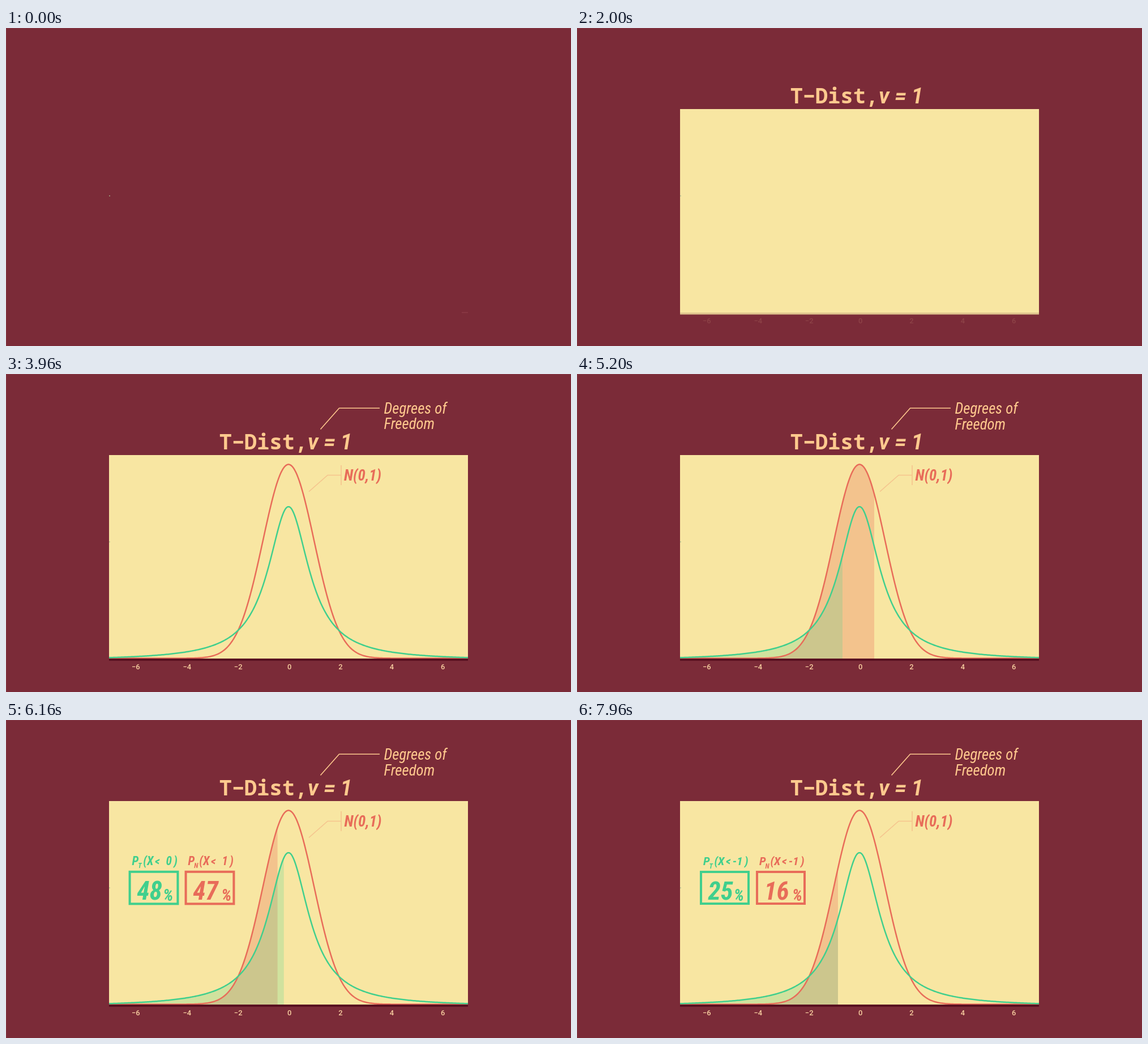
Animation, 998 px wide and 561 px high, one loop 8 s. Source, as an HTML page:

```html
<!DOCTYPE html>
<html lang="en">
<head>
<meta charset="utf-8">
<title>The Student's T distribution</title>
<style>
  html, body { margin: 0; width: 100%; height: 100%; overflow: hidden; background: #7b2b38; }
  svg { display: block; width: 100vw; height: 100vh; }
  text { font-family: Roboto, "Open Sans", sans-serif; white-space: pre; }
  .cond { font-family: "Roboto Condensed", Roboto, "Open Sans", sans-serif; font-stretch: 75%; }
  .mono { font-family: "Roboto Mono", "Noto Sans Mono", "DejaVu Sans Mono", monospace; }
  .bold { font-weight: 700; }
  .ital { font-style: italic; }
  .line { fill: none; stroke-linejoin: round; }
</style>
</head>
<body>
<svg id="stage" viewBox="0 0 998 561" preserveAspectRatio="none">
  <defs>
    <clipPath id="tEdge"><rect id="tClip" x="182" y="143" width="0" height="359"/></clipPath>
    <clipPath id="nEdge"><rect id="nClip" x="182" y="143" width="0" height="359"/></clipPath>
    <clipPath id="plot"><rect x="182" y="143" width="634" height="361"/></clipPath>
    <clipPath id="slot"><rect x="593" y="155" width="110" height="50"/></clipPath>
  </defs>
</svg>
<script>
const LOOP = 8000;
const CREAM = '#fbe3a3', PEACH = '#ffc98e', GREEN = '#40cf8d', RED = '#e86c59';
const LEFT = 182, RIGHT = 816, MID = 499;
const stage = document.getElementById('stage');

function add(parent, tag, attrs, content) {
  const el = document.createElementNS('http://www.w3.org/2000/svg', tag);
  for (const k in attrs) el.setAttribute(k, attrs[k]);
  if (content !== undefined) el.textContent = content;
  parent.appendChild(el);
  return el;
}
const group = (parent, attrs) => add(parent, 'g', attrs || {});

// Falls back to a narrowed Roboto when no condensed face is available
function condensedScale() {
  const measure = cls => {
    const el = add(stage, 'text', { class: cls, 'font-size': 100 }, 'DISTRIBUTION');
    const w = el.getComputedTextLength();
    el.remove();
    return w;
  };
  return measure('cond') < measure('') * 0.97 ? 1 : 0.88;
}
const narrow = condensedScale();

function label(parent, x, y, size, fill, cls, str, extra) {
  const k = cls.includes('cond') ? narrow : 1;
  return add(parent, 'text', Object.assign({
    transform: `translate(${x} ${y}) scale(${k} 1)`, 'font-size': size, fill, class: cls
  }, extra), str);
}

const clamp = v => Math.max(0, Math.min(1, v));
const span = (t, start, dur) => clamp((t - start) / dur);
const inOut = p => p < 0.5 ? 2 * p * p : 1 - 2 * (1 - p) ** 2;
const inOut3 = p => p < 0.5 ? 4 * p ** 3 : 1 - 4 * (1 - p) ** 3;
const spring = d => d <= 0 ? 0 : 1 - Math.exp(-d / 180) * Math.cos(2 * Math.PI * d / 420);
const scaleAt = (el, x, y, s) => el.setAttribute('transform', `translate(${x} ${y}) scale(${s}) translate(${-x} ${-y})`);
const shift = (el, x) => el.setAttribute('transform', `translate(${x} 0)`);
const show = (el, on) => el.setAttribute('visibility', on ? 'visible' : 'hidden');

function stroke(parent, d, color, width) {
  return add(parent, 'path', {
    d, class: 'line', stroke: color, 'stroke-width': width, pathLength: 1, 'stroke-dasharray': '1 2'
  });
}
function draw(path, p) {
  show(path, p > 0);
  path.setAttribute('stroke-dashoffset', 1 - p);
}
function curve(fn) {
  const pts = [];
  for (let x = LEFT; x <= RIGHT; x += 2) pts.push(x + ' ' + fn(x - MID).toFixed(2));
  return 'M' + pts.join('L');
}
const tCurve = curve(x => 505.5 - 271.5 / (1 + (x / 44) ** 2));
const nCurve = curve(x => 501.5 - 342 * Math.exp(-((x / 45.2) ** 2) / 2));
const closed = d => `${d}L${RIGHT} 506L${LEFT} 506Z`;

// Background
add(stage, 'rect', { width: 998, height: 561, fill: '#7b2b38' });
add(stage, 'path', { d: 'M.5 561V.5H998', class: 'line', stroke: '#fff', opacity: 0.06 });
add(stage, 'rect', { x: 805, y: 501.5, width: 11, height: 1, fill: '#a4525a', opacity: 0.6 });

// Opening line
const words = [
  [112, 'THE ', 'cond', 0],
  [191, 'STUDENT\u2019S ', 'cond bold', 2.1],
  [395, 'T ', 'cond bold', 0],
  [430.5, 'DISTRIBUTION', 'cond', 0]
].map(([x, str, cls, gap]) => ({
  str, el: label(stage, x, 273, 37, CREAM, cls, '', { 'letter-spacing': gap })
}));

// Chart
const panel = group(stage);
add(panel, 'rect', { x: LEFT, y: 143, width: 634, height: 362.5, fill: '#f8e6a2' });
const chart = group(stage, { 'clip-path': 'url(#plot)' });
add(chart, 'path', { d: closed(nCurve), fill: RED, 'fill-opacity': 0.29, 'clip-path': 'url(#nEdge)' });
add(chart, 'path', { d: closed(tCurve), fill: GREEN, 'fill-opacity': 0.22, 'clip-path': 'url(#tEdge)' });
const nLine = stroke(chart, nCurve, RED, 2.5);
const tLine = stroke(chart, tCurve, GREEN, 2.5);
const tClip = document.getElementById('tClip'), nClip = document.getElementById('nClip');

const axis = group(stage);
add(axis, 'rect', { x: LEFT, y: 502, width: 634, height: 4, fill: '#591021' });
for (let v = -6; v <= 6; v += 2) {
  label(axis, 500.6 + v * 45.2, 521, 13, '#f8cfa0', '', String(v).replace('-', '\u2212'),
    { 'text-anchor': 'middle', 'font-weight': 500 });
}
add(stage, 'rect', { x: 182, y: 295.5, width: 2, height: 1.3, fill: '#a9c08f' });

// Heading
const heading = group(stage);
label(heading, 376.7, 133, 37, PEACH, 'mono bold', 'T\u2212Dist,');
[[533, 'v'], [561, '='], [590.5, '1']].forEach(([x, s]) => label(heading, x, 133, 38, PEACH, 'bold ital', s));

const pointer = stroke(stage, 'M555.5 97.5L588.5 60.3H660', PEACH, 1.6);
const degrees = group(stage);
label(degrees, 667.5, 70, 26.8, PEACH, 'cond ital', 'Degrees of');
label(degrees, 667.5, 97.5, 26.8, PEACH, 'cond ital', 'Freedom');

// Normal curve callout
const callLine = stroke(stage, 'M535 207.5L568 178.5H592', '#f5c38d', 1.6);
const callBar = add(stage, 'path', { class: 'line', stroke: '#f5c38d', 'stroke-width': 1.6 });
const callText = group(group(stage, { 'clip-path': 'url(#slot)' }));
label(callText, 597.5, 188, 27, RED, 'cond bold ital', 'N(0,1)');

// Probability boxes
function stat(x, color, sub, pctX) {
  const g = group(stage);
  const put = (dx, y, size, str, extra) => label(g, x + dx, y, size, color, 'cond bold ital', str, extra);
  add(g, 'rect', { x: x + 2, y: 268, width: 84, height: 56, fill: 'none', stroke: color, 'stroke-width': 4 });
  put(6, 256, 21, 'P');
  put(16.5, 261.5, 12, sub);
  put(25.5, 256, 21, '(X');
  put(46, 256, 20, '<');
  const limit = put(75.5, 256, 21, '', { 'text-anchor': 'end' });
  put(79, 256, 21, ')');
  const value = put(14.5, 317, 45, '');
  put(pctX, 319, 29, '%', { 'font-weight': 500 });
  return {
    g,
    set(scale, lim, pct) {
      show(g, scale > 0);
      scaleAt(g, x + 44, 290, Math.max(scale, 0.001));
      limit.textContent = lim;
      value.textContent = Math.round(pct);
    }
  };
}
const tStat = stat(217, GREEN, 'T', 60);
const nStat = stat(316, RED, 'N', 64);

const tProb = x => 100 * (0.5 + Math.atan(x) / Math.PI);
// Logistic-style approximation of the normal distribution function
const nProb = x => 100 / (1 + Math.exp(-1.5957 * x - 0.0713 * x ** 3));

// Shaded area grows to the right, then falls back to the left tail
function edge(t, riseAt, riseDur, fallAt, fallDur) {
  const rise = inOut(span(t, riseAt, riseDur)), fall = inOut(span(t, fallAt, fallDur));
  return (540 - LEFT) * rise - (540 - 461) * fall;
}

function render(t) {
  const typed = inOut(span(t, 460, 740)), erased = span(t, 1440, 560) ** 4;
  let left = Math.round(28 * typed) - Math.round(28 * erased);
  for (const w of words) {
    w.el.textContent = w.str.slice(0, Math.max(0, left));
    left -= w.str.length;
  }

  const slide = inOut3(span(t, 1630, 380));
  shift(panel, 816 * (1 - slide));
  shift(heading, -638 * (1 - slide));
  axis.setAttribute('opacity', span(t, 1980, 140));
  draw(pointer, inOut(span(t, 2040, 260)));
  draw(tLine, inOut(span(t, 2040, 560)));
  const pop = spring(t - 2360);
  show(degrees, pop > 0);
  scaleAt(degrees, 667.5, 62, Math.max(pop, 0.001));

  draw(nLine, inOut(span(t, 2970, 560)));
  draw(callLine, inOut(span(t, 3380, 220)));
  const h = 17.5 * inOut(span(t, 3560, 160));
  callBar.setAttribute('d', `M592 ${178.5 - h}V${178.5 + h}`);
  shift(callText, -80 * (1 - span(t, 3600, 500)) ** 4);

  nClip.setAttribute('width', edge(t, 4200, 1170, 5800, 550));
  tClip.setAttribute('width', edge(t, 4360, 1228, 5840, 567));

  const x = 1 - 2 * inOut(span(t, 5840, 620));
  const grow = spring(t - 5460);
  tStat.set(grow, String(Math.round(x)), tProb(x));
  nStat.set(grow, x > -0.3 ? '1' : '-1', nProb(x));
}

const begin = performance.now();
function tick() {
  render((performance.now() - begin) % LOOP);
  requestAnimationFrame(tick);
}
render(0);
requestAnimationFrame(tick);
</script>
</body>
</html>
```
